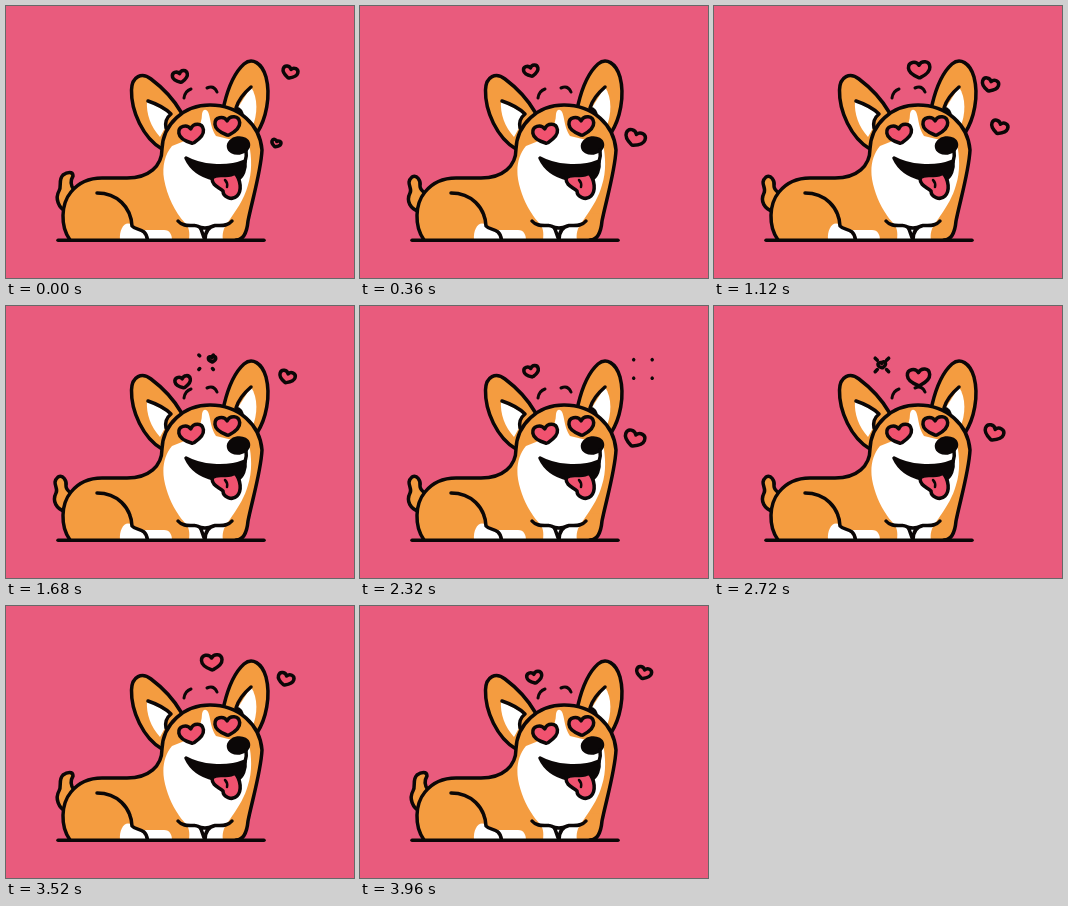
An HTML page for the animation above (4000 ms loop, 348x272 px).

```html
<!DOCTYPE html>
<html lang="en">
<head>
<meta charset="utf-8">
<title>Corgi in love</title>
<style>
  html, body { margin: 0; width: 100%; height: 100%; overflow: hidden; background: #e95b7d; }
  svg { display: block; width: 100%; height: 100%; }
  .ink { fill: none; stroke: #0b0707; stroke-width: 3.5; stroke-linecap: round; stroke-linejoin: round; }
  .fur { fill: #f49c40; }
  .white { fill: #fff; }
  .pink { fill: #f0526f; }
  .black { fill: #0b0707; }
</style>
</head>
<body>
<svg viewBox="0 0 348 272">
  <defs>
    <path id="heart" vector-effect="non-scaling-stroke" d="M0-.42C.25-.86 1-.82 1-.2C1 .24 .45 .56 .1 .72Q0 .77-.1 .72C-.45 .56-1 .24-1-.2C-1-.82-.25-.86 0-.42Z"/>
  </defs>
  <rect width="348" height="272" fill="#e95b7d"/>

  <path id="tail" class="ink fur"/>

  <!-- body -->
  <path class="fur" d="M64 234C54 220 55 198 65 186C73 176 83 172 96 172H121C143 172 156 160 156 140L256 144C255 165 246 195 242 215C241 226 238 234 230 234Z"/>
  <path class="white" d="M114 234C113 223 119 214 126 219C130 223 134 224 141 224H158C164 224 166 229 166 234Z"/>

  <!-- ears -->
  <path class="ink fur" d="M156 143C137 132 125 105 125.500 84C126 70 136 66 145 73C157 82 168 94 175 106"/>
  <path class="white" d="M141 95L165 108C159 113 158 118 159 122L154 131C145 121 140 108 141 95Z"/>
  <path class="ink" d="M142 95C151 98 159 102 165 108C160 112 159 117 160 122"/>
  <path class="ink fur" d="M218 99C222 82 229 66 238 58C246 51 256 57 260 71C265 90 260 113 251 127"/>
  <path class="white" d="M245 81L231 103L236 122H246C252 108 252 92 245 81Z"/>
  <path class="ink" d="M245 81C238 87 232 95 230 102Q236 104 236 110"/>

  <!-- head and chest -->
  <path class="fur" d="M156 143C157 118 178 99 204 99C233 99 254 119 256 144C255 165 247 190 243 208L180 206C161 189 153 168 156 143Z"/>
  <path class="white" d="M200 104C205 106 203 120 210 130L243 138C246 152 246 167 242 179C238 194 229 206 222 216C217 222 216 229 217 234H183C184 226 183 221 179 217C169 206 161 190 158 173C156 160 159 148 166 140L176 136C188 132 196 120 196 108Q197 103 200 104Z"/>
  <path class="ink" d="M64 234C54 220 55 198 65 186C73 176 83 172 96 172H121C143 172 156 160 156 143C157 118 178 99 204 99C233 99 254 119 256 144C255 165 246 195 242 215C241 226 238 234 230 234"/>

  <!-- legs -->
  <path class="ink" d="M91 187C111 187 125 201 126 220C130 225 140 221 141.500 234"/>
  <path class="ink" d="M172 215C177 221 184 219 189 219.500C196 220 195 225 199 234M226 215C221 221 214 219 209 219.500C202 221 199 226 199 234M191 220Q199 224 207 220"/>

  <!-- mouth -->
  <path class="ink black" d="M180 152C194 160 220 163 239 155C240 163 237 171 231 174L208 173C195 170 185 163 180 152Z"/>
  <path class="ink pink" d="M206 172C212 166 222 173 229 167C235 174 236 185 231 190C226 195 217 191 217 185C213 181 206 180 206 172Z"/>
  <path class="ink" style="stroke-width:2.500" d="M219 174Q222 177 221 181"/>
  <ellipse class="black" cx="232.500" cy="139.500" rx="11.800" ry="9.300" transform="rotate(-8 232.500 139.500)"/>
  <path class="ink" d="M240 144Q241 150 239 156"/>

  <!-- eyes and brows -->
  <use href="#heart" class="ink pink" transform="translate(185.500 128) rotate(-8) scale(12.400)"/>
  <use href="#heart" class="ink pink" transform="translate(221.500 120) rotate(-4) scale(12.400)"/>
  <path class="ink" style="stroke-width:3" d="M178 92Q179 85 185 83M201 82Q208 79 211 86"/>

  <path class="ink" d="M52 234.300H258"/>
  <g id="love"></g>
</svg>
<script>
const NS = 'http://www.w3.org/2000/svg';
const CYCLE = 2000, STEP = 40, POP = 1150, LIFE = 1310;
const tail = document.getElementById('tail');
const love = document.getElementById('love');

// birth time, start, speed per second, half width, tilt, burst offset
const hearts = [
  { born: 1540, x: 178.2, y: 78.3, vx: -8.7, vy: -16.4, r: 7.2, tilt: -12, bx: 0, by: 0 },
  { born: 1040, x: 275.3, y: 80.1, vx: 9.1, vy: -14.2, r: 7.6, tilt: 17, bx: -4, by: 1 },
  { born: 1980, x: 269.8, y: 137.7, vx: 13.5, vy: -14.2, r: 9.4, tilt: 21, bx: 0, by: 0 },
  { born: 480, x: 204.3, y: 75.8, vx: 1.5, vy: -18.8, r: 10.4, tilt: -3, bx: -6, by: 3 }
];

function add(tag, cls) {
  const el = document.createElementNS(NS, tag);
  el.setAttribute('class', cls);
  love.appendChild(el);
  return el;
}

for (const h of hearts) {
  h.shape = add('use', 'ink pink');
  h.shape.setAttribute('href', '#heart');
  h.rays = add('path', 'ink');
}

const clamp = v => Math.max(0, Math.min(1, v));
const smooth = v => { v = clamp(v); return v * v * (3 - 2 * v); };

const tailLeft = [60, 206, 50, 203, 46, 195, 50, 187, 53, 182, 45, 177, 52, 171, 57, 168, 61, 175, 60, 180, 60, 183, 62, 185, 65, 187];
const tailRight = [61, 206, 52, 202, 49, 192, 53, 185, 56, 180, 52, 174, 57, 169, 61, 166, 67, 165, 67, 170, 64, 175, 65, 180, 68, 184];

function drawTail(t) {
  const k = smooth((Math.cos(t / 500 * 2 * Math.PI) - .05) / .85);
  const p = tailLeft.map((v, i) => v + (tailRight[i] - v) * k);
  tail.setAttribute('d', `M${p.slice(0, 2)}C${p.slice(2)}`);
}

function burst(x, y, p) {
  const far = 6 + 4 * p, near = far - 4 * clamp(1 - 2.5 * p) - .01;
  return [[-1, -1], [1, -1], [-1, 1], [1, 1]].map(([a, b]) =>
    `M${x + a * near} ${y + b * near}L${x + a * far} ${y + b * far}`).join('');
}

function drawHeart(h, t) {
  const age = (t - h.born + CYCLE) % CYCLE;
  const x = h.x + h.vx * age / 1000, y = h.y + h.vy * age / 1000;
  const grow = clamp(.2 + age / 80) * (1.1 - .13 * age / 1200);
  const size = h.r * grow * clamp(1 - (age - POP + 20) / 110);
  const alive = age < POP + 85;
  h.shape.style.display = alive ? '' : 'none';
  if (alive) h.shape.setAttribute('transform', `translate(${x} ${y}) rotate(${h.tilt}) scale(${size})`);
  const popping = age >= POP && age < LIFE;
  h.rays.setAttribute('d', popping ? burst(x + h.bx, y + h.by, (age - POP) / (LIFE - POP)) : '');
}

function draw(ms) {
  const t = Math.floor(ms / STEP) * STEP % CYCLE;
  drawTail(t);
  hearts.forEach(h => drawHeart(h, t));
}

const start = performance.now();
function tick() {
  draw(performance.now() - start);
  requestAnimationFrame(tick);
}
tick();
</script>
</body>
</html>
```
